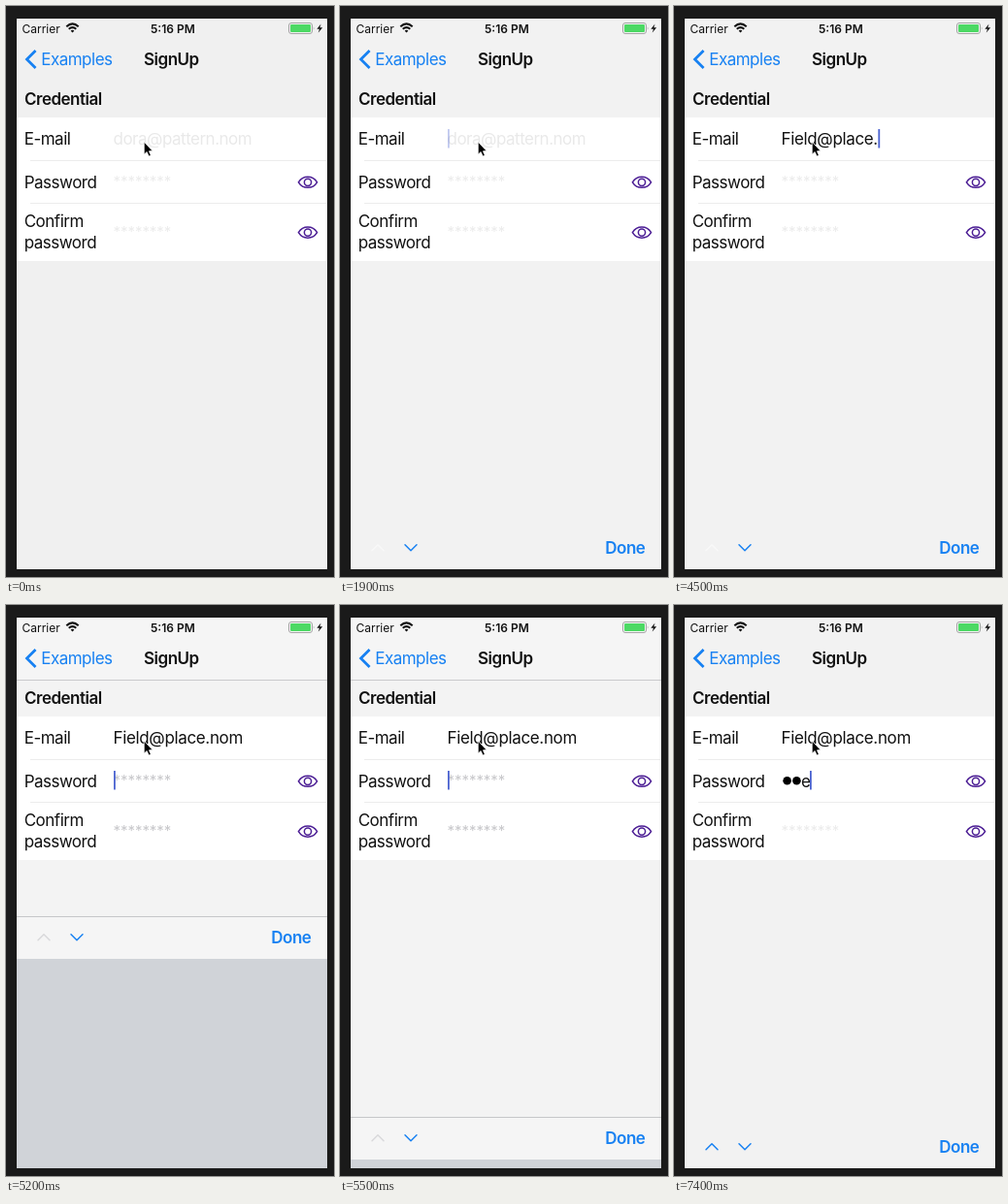
An HTML page that plays this animation: 338 px wide and 589 px high, repeating every 8 s.

```html
<!DOCTYPE html>
<html lang="en">
<head>
<meta charset="utf-8">
<title>Sign-up form</title>
<style>
html, body { margin: 0; width: 100%; height: 100%; overflow: hidden; background: #1a1a1a }
svg { display: block; width: 338px; height: 589px }
text { font: 17px Inter, Roboto, sans-serif; letter-spacing: -.5px; fill: #111 }
.bold { font-weight: 600 }
.small { font-size: 12px; letter-spacing: 0 }
.blue { fill: #1781f2 }
.stars { font-size: 15px }
.line { fill: none; stroke: #1781f2; stroke-width: 1.5; stroke-linecap: round; stroke-linejoin: round }
.eye { fill: none; stroke: #4b1d94; stroke-width: 1.5 }
</style>
</head>
<body>
<svg viewBox="0 0 338 589">
  <defs>
    <g id="eye" class="eye">
      <path d="M-9.6 0C-5-7.4 5-7.4 9.6 0C5 7.4-5 7.4-9.6 0z"/>
      <circle r="3.6"/>
    </g>
  </defs>
  <rect id="page" x="11" y="13" width="320" height="568"/>
  <rect id="nav" x="11" y="13" width="320" height="64" fill="#f5f5f5"/>
  <path id="navLine" d="M11 77.5H331" stroke="#cacacc"/>

  <text class="small" x="16.5" y="27.5">Carrier</text>
  <g fill="none" stroke="#111" stroke-width="2">
    <path d="M62.3 21.2Q68.5 15.6 74.7 21.2M64.7 23.8Q68.5 20.4 72.3 23.8"/>
    <path d="M66.6 25.6L68.5 27.6L70.4 25.6Q68.5 24 66.6 25.6z" fill="#111" stroke="none"/>
  </g>
  <text class="small bold" x="149" y="27.5">5:16 PM</text>
  <rect x="291.5" y="17.5" width="24" height="11" rx="2.5" fill="none" stroke="#a5a5a5"/>
  <rect x="293" y="19" width="21" height="8" rx="1.2" fill="#4cd964"/>
  <path d="M316.8 21.2v3.6q1.6-1.8 0-3.6z" fill="#a5a5a5"/>
  <path d="M324.5 18.5L320.4 23.8H323L321.8 27.6L326.2 22.2H323.4z" fill="#111"/>

  <path class="line" d="M30.5 46L21.5 55L30.5 64" style="stroke-width:2.8;stroke-linecap:butt;stroke-linejoin:miter"/>
  <text class="blue" x="36.2" y="61">Examples</text>
  <text class="bold" x="142" y="61">SignUp</text>
  <text class="bold" x="19" y="102">Credential</text>

  <rect x="11" y="115" width="320" height="148" fill="#fff"/>
  <path d="M25 159.5H331M25 203.5H331" stroke="#ececec"/>
  <text x="18.7" y="143">E-mail</text>
  <text x="18.7" y="187.5">Password</text>
  <text x="18.7" y="228">Confirm</text>
  <text x="18.7" y="250">password</text>
  <use href="#eye" x="311" y="181.8"/>
  <use href="#eye" x="311" y="233.6"/>

  <text id="hint" x="110.5" y="142.5" style="fill:#e9e9e9">dora@pattern.nom</text>
  <text id="stars1" class="stars" y="186.4">********</text>
  <text id="stars2" class="stars" y="238.2">********</text>
  <text id="email" x="110.5" y="142.5" style="letter-spacing:-.35px"></text>
  <g id="dots"><circle cx="116.6" cy="181.3" r="4.3"/><circle cx="126.4" cy="181.3" r="4.3"/></g>
  <text id="letter" x="131" y="187.5">e</text>
  <rect id="caret" width="1.8" height="19.5" fill="#4a62d0"/>

  <g id="bar">
    <g id="panel">
      <rect x="11" width="320" height="44" fill="#f5f5f5"/>
      <path d="M11 .5H331" stroke="#c6c7c9"/>
      <rect x="11" y="44" width="320" height="216" fill="#d0d3d8"/>
    </g>
    <path id="up" class="line" d="M33 24.7L39 18.7L45 24.7"/>
    <path class="line" d="M67 18.7L73 24.7L79 18.7"/>
    <text class="bold blue" x="273.3" y="28.4">Done</text>
  </g>
  <g id="edge">
    <rect x="11" y="579" width="320" height="2" fill="#1a1a1a"/>
    <rect x="43" y="579" width="260" height="2" fill="#fff"/>
  </g>
  <path d="M0 0H338V589H0zM11 13V581H331V13z" fill="#1a1a1a"/>
  <path d="M142.3 140.3V153L145.2 150.5L147.2 155L149.3 154L147.4 149.8L151 149.4z" stroke="#fff" stroke-width=".7"/>
</svg>
<script>
const $ = id => document.getElementById(id);
const set = (id, attrs) => { for (const k in attrs) $(id).setAttribute(k, attrs[k]); };
const show = (id, on) => set(id, { visibility: on ? 'visible' : 'hidden' });

const LOOP = 8000, TICK = 100;
const ADDRESS = 'Field@place.nom';
// [time, number of characters typed]
const KEYS = [[2400, 1], [2600, 2], [2800, 3], [3000, 4], [3100, 5], [3200, 6], [4000, 7],
  [4100, 8], [4200, 9], [4300, 11], [4500, 12], [4700, 13], [4800, 14], [4900, 15]];
// [time, caret opacity]
const BLINKS = [[0, 0], [900, 1], [1900, .35], [2000, 0], [2400, 1], [3500, .35], [3600, 0],
  [4000, 1], [6100, .35], [6200, 0], [6400, 1]];

const at = (steps, t) => steps.reduce((v, [time, value]) => t >= time ? value : v, 0);

// Critically damped spring, 0 to 1
function spring(ms) {
  const x = Math.max(0, ms) * .01826;
  return 1 - (1 + x) * Math.exp(-x);
}

const starX = Array.from({ length: 8 }, (_, i) => 110.6 + 7.45 * i).join(' ');
set('stars1', { x: starX });
set('stars2', { x: starX });

function draw(t) {
  const password = t >= 5200, sliding = password && t < 5600;
  const typed = at(KEYS, t), dots = t >= 7000 ? 2 : t >= 6400 ? 1 : 0, letter = t >= 7400;

  set('page', { fill: sliding ? '#f3f3f3' : t < 900 ? '#f0f0f0' : '#f2f2f2' });
  show('nav', sliding);
  show('navLine', sliding);

  show('hint', !typed);
  for (const id of ['stars1', 'stars2']) $(id).style.fill = sliding ? '#c9c9cc' : '#ececec';
  show('stars1', t < 6200);
  $('email').textContent = ADDRESS.slice(0, typed);
  [...$('dots').children].forEach((dot, i) => dot.setAttribute('visibility', i < dots ? 'visible' : 'hidden'));
  show('letter', letter);

  const x = password
    ? (letter ? 140 : 111 + 10 * dots)
    : 111 + (typed && $('email').getComputedTextLength());
  set('caret', { x, y: password ? 171 : 127, opacity: at(BLINKS, t) });

  const y = password ? 321 + 216 * spring(t - 5229) : 581 - 44 * spring(t - 860);
  set('bar', { transform: `translate(0 ${Math.round(y)})` });
  show('bar', t >= 900);
  show('panel', sliding);
  $('up').style.stroke = sliding ? '#d9d9db' : password ? '#1781f2' : '#f8f8f8';
  show('edge', t >= 5600 && t < 5900);
}

function frame(now) {
  draw(Math.floor(now % LOOP / TICK) * TICK);
  requestAnimationFrame(frame);
}
draw(0);
requestAnimationFrame(frame);
</script>
</body>
</html>
```
